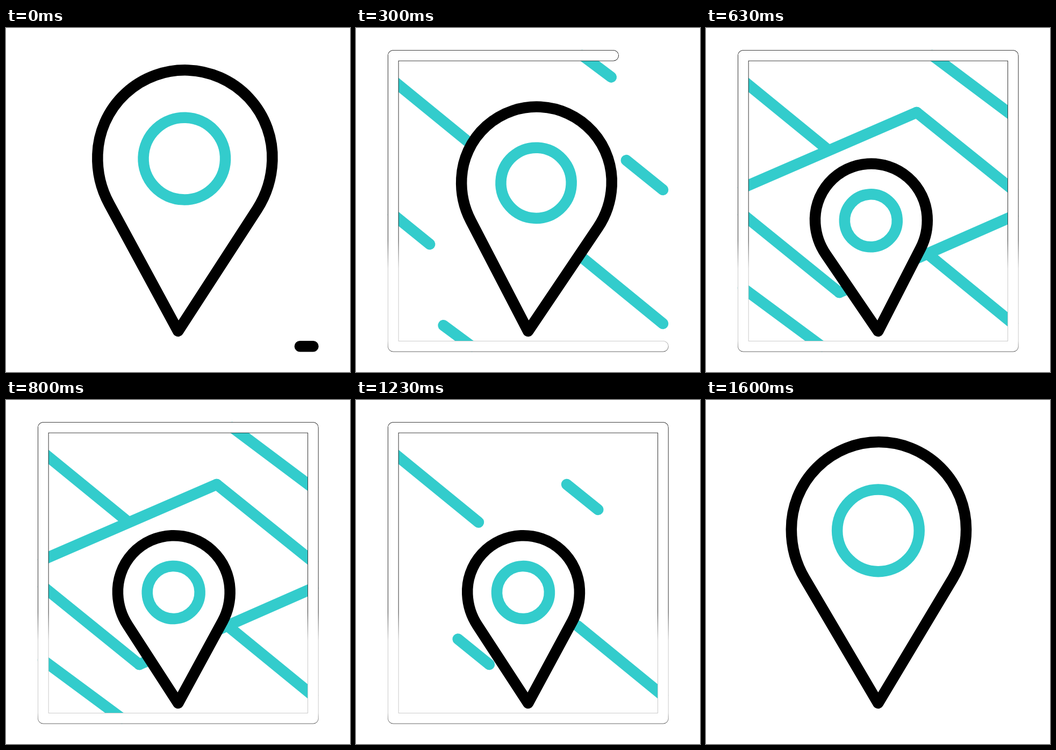
Write an HTML page with a canvas that moves like this. It is 640x640 px and loops after 1670 ms.

```html
<!DOCTYPE html>
<html lang="en">
<head>
<meta charset="utf-8">
<title>Map pin</title>
<style>
  html, body { margin: 0; height: 100%; overflow: hidden; background: #fff; }
  canvas { display: block; }
</style>
</head>
<body>
<canvas id="stage" width="640" height="640"></canvas>
<script>
const ctx = document.getElementById('stage').getContext('2d');
const LOOP = 1670, WEIGHT = 20.5, TEAL = '#33cccc';
const OUTLINE_FROM = 215;

const ramp = (t, from, to) => Math.min(1, Math.max(0, (t - from) / (to - from)));
const smooth = u => u * u * (3 - 2 * u);
const easeQuad = u => u < .5 ? 2 * u * u : 1 - 2 * (1 - u) ** 2;

// Eased value between [time, value] keys
function keyed(t, keys) {
  const i = Math.max(1, keys.findIndex(k => k[0] > t));
  const [t0, v0] = keys[i - 1], [t1, v1] = keys[i];
  return v0 + (v1 - v0) * smooth(ramp(t, t0, t1));
}

const angleKeys = [[-39, 0], [190, 25.2], [410, -18.5], [650, -3.5], [970, -1.1], [1230, -2.6], [1600, 0], [1700, 0]];
const scaleKeys = [[0, 1], [190, 1], [450, .642], [1240, .642], [1590, 1], [1700, 1]];

const box = [[571.25, 592.2], [69.25, 592.2], [69.25, 51.3], [571.25, 51.3], [571.25, 592.2]];

// Points, drawing time, erasing time, and whether erasing runs backwards
const roads = [
  { points: [[70, 98.5], [228, 227.5]], draw: [135, 300], erase: [1270, 1420] },
  { points: [[571, 550], [412, 420]], draw: [135, 300], erase: [1270, 1420] },
  { points: [[571, 301], [392, 157]], draw: [240, 400], erase: [1140, 1275] },
  { points: [[69, 347], [248, 492]], draw: [240, 400], erase: [1140, 1275] },
  { points: [[421, 51], [571, 163.5]], draw: [240, 410], erase: [1100, 1220] },
  { points: [[215, 592], [69, 484]], draw: [240, 410], erase: [1100, 1220] },
  { points: [[392, 157], [69, 297]], draw: [400, 500], erase: [1040, 1140], back: true },
  { points: [[248, 492], [571, 350]], draw: [400, 500], erase: [1040, 1140], back: true }
];

// Stroke the part of a polyline between two fractions of its length
function trim(points, start, end, color, width = WEIGHT) {
  if (end <= start) return;
  const length = points.slice(1).reduce((sum, [x, y], i) =>
    sum + Math.hypot(x - points[i][0], y - points[i][1]), 0);
  ctx.beginPath();
  points.forEach(p => ctx.lineTo(...p));
  ctx.setLineDash([length * (end - start), 9999]);
  ctx.lineDashOffset = -length * start;
  ctx.strokeStyle = color;
  ctx.lineWidth = width;
  ctx.stroke();
  ctx.setLineDash([]);
}

function drawRoad(t, { points, draw, erase, back }) {
  const shown = ramp(t, ...draw), gone = ramp(t, ...erase);
  trim(points, back ? 0 : gone, back ? Math.min(shown, 1 - gone) : shown, TEAL);
}

const edge = ctx.createLinearGradient(0, 395, 0, 603);
edge.addColorStop(0, '#000');
edge.addColorStop(.25, '#bbb');
edge.addColorStop(.9, '#bbb');
edge.addColorStop(1, '#333');

function drawBox(t) {
  const start = smooth(ramp(t, 1240, 1590));
  const end = easeQuad(ramp(t, -42, 520));
  const hollow = t >= OUTLINE_FROM;
  trim(box, start, end, hollow ? edge : '#000');
  if (hollow) trim(box, start, end, '#fff', WEIGHT - 1.6);
}

// Round head whose lower half is slightly longer, with tangents to the tip
function pinPath(scale) {
  const x = 1.2 * scale, y = -323.3 * scale, radius = 162.6 * scale, low = 172 * scale;
  const slope = Math.asin(low / -y);
  ctx.beginPath();
  ctx.moveTo(0, 0);
  ctx.ellipse(x, y, radius, low, 0, Math.PI - slope, Math.PI);
  ctx.arc(x, y, radius, Math.PI, 0);
  ctx.ellipse(x, y, radius, low, 0, 0, slope);
  ctx.closePath();
}

function drawPin(t) {
  const scale = keyed(t, scaleKeys);
  ctx.save();
  ctx.translate(320.2, 564);
  ctx.rotate(keyed(t, angleKeys) * Math.PI / 180);
  ctx.lineWidth = WEIGHT;
  pinPath(scale);
  ctx.fillStyle = '#fff';
  ctx.fill();
  ctx.strokeStyle = '#000';
  ctx.stroke();
  ctx.beginPath();
  ctx.arc(.2 * scale, -321.1 * scale, 76.3 * scale, 0, 2 * Math.PI);
  ctx.strokeStyle = TEAL;
  ctx.stroke();
  ctx.restore();
}

function render() {
  const t = performance.now() % LOOP;
  ctx.fillStyle = '#fff';
  ctx.fillRect(0, 0, 640, 640);
  ctx.lineCap = ctx.lineJoin = 'round';
  roads.forEach(road => drawRoad(t, road));
  drawBox(t);
  drawPin(t);
  requestAnimationFrame(render);
}
render();
</script>
</body>
</html>
```
